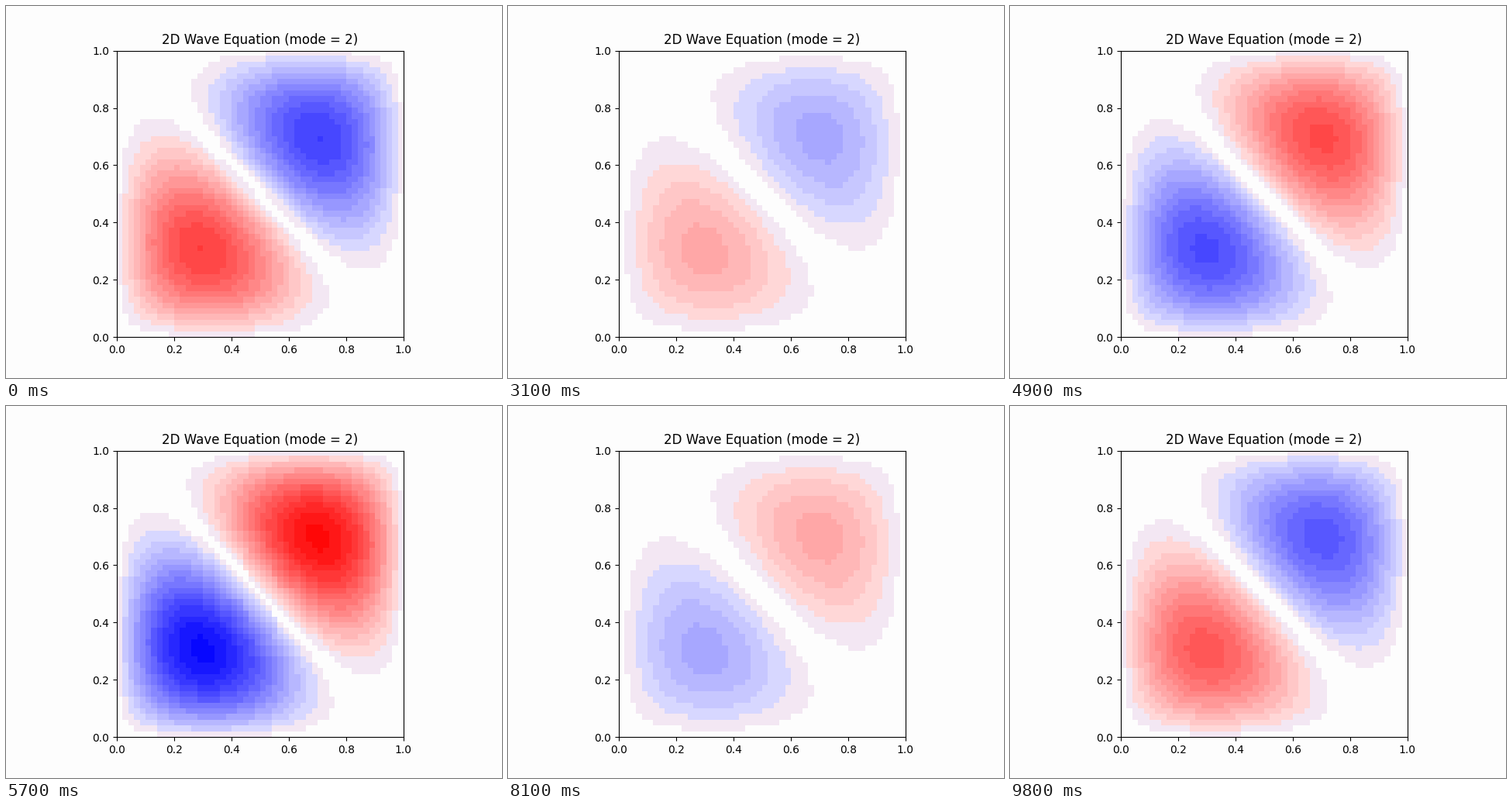
A matplotlib script that plays this animation: 640 px wide and 480 px high, repeating every 9.9 s.

```python
import numpy as np
import matplotlib.pyplot as plt
from matplotlib.animation import FuncAnimation
from matplotlib.colors import ListedColormap

plt.rcParams["font.family"] = "DejaVu Sans"

CELLS = 50
FRAMES = 99
PERIOD = 100
PEAK = 11.5      # frame position of the largest swing
SKEW = 0.025     # imbalance between the two degenerate modes
BANDS = 16       # colour bands per sign
PAPER = (253 / 255,) * 3
LAVENDER = (243 / 255, 231 / 255, 243 / 255)


def band_colors(tint):
    """Colours from zero to full displacement for one sign."""
    fades = [1 - (n + 0.5) / BANDS for n in range(2, BANDS)]
    return [PAPER, LAVENDER] + [tint(f) for f in fades]


def mode_shape():
    """Interior grid values of the mixed (2,1)/(1,2) membrane mode."""
    s = np.pi * np.arange(1, CELLS + 1) / (CELLS + 1)
    x, y = np.meshgrid(s, s)
    u = ((1 + SKEW) * np.sin(2 * x) * np.sin(y)
         + (1 - SKEW) * np.sin(x) * np.sin(2 * y))
    return u / u.max()


blues = band_colors(lambda f: (f, f, 1))
reds = band_colors(lambda f: (1, f, f))
cmap = ListedColormap(blues[::-1] + reds)
shape = mode_shape()


def wave(i):
    return shape * np.cos(2 * np.pi * (i - PEAK) / PERIOD)


fig, ax = plt.subplots(figsize=(6.4, 4.8), dpi=100, facecolor=PAPER)
ax.set_facecolor(PAPER)
image = ax.imshow(wave(0), cmap=cmap, vmin=-1, vmax=1, origin="lower",
                  extent=(0, 1, 0, 1), interpolation="nearest")
ax.set_title("2D Wave Equation (mode = 2)")


def update(i):
    image.set_data(wave(i))
    return [image]


anim = FuncAnimation(fig, update, frames=FRAMES, interval=100,
                     repeat=True, repeat_delay=0)
plt.show()
```
